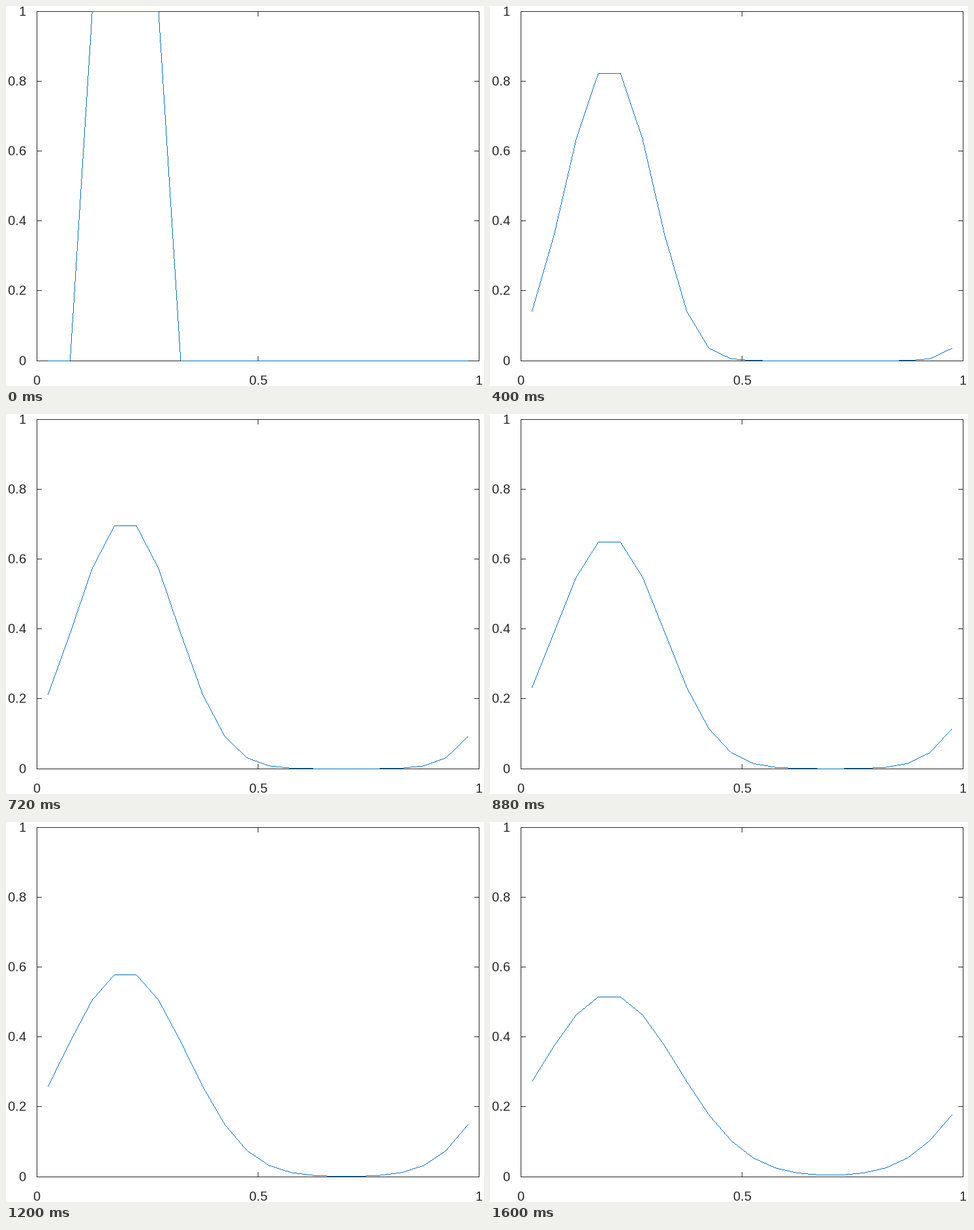
These frames come from a looping animation (733 px wide and 583 px high, 1680 ms). A matplotlib script:

```python
import math

import matplotlib.pyplot as plt
import numpy as np
from matplotlib.animation import FuncAnimation
from matplotlib.colors import to_rgba

W, H, DPI = 733, 583, 100
PX = 72 / DPI  # one pixel in points
LEFT, RIGHT, TOP, BOTTOM = 47.5, 725.5, 8.5, 544.1
TICK = 7
DIGIT, POINT = 11, 6  # whole-pixel pen advances of the label font
INK, BLUE = "#262626", "#0072bd"
CELLS, STEPS, RATE = 20, 21, 0.2


def to_x(v):
    return LEFT + v * (RIGHT - LEFT)


def to_y(v):
    return BOTTOM - v * (BOTTOM - TOP)


def centre(v):
    """Move a coordinate to the middle of its pixel."""
    return math.floor(v) + 0.5


def diffuse(u):
    """One explicit heat step on a periodic grid."""
    return u + RATE * (np.roll(u, 1) - 2 * u + np.roll(u, -1))


def solve():
    x = (np.arange(CELLS) + 0.5) / CELLS
    states = [np.where((x > 0.1) & (x < 0.3), 1.0, 0.0)]
    while len(states) < STEPS:
        states.append(diffuse(states[-1]))
    return x, states


def scan(a0, b0, a1, b1):
    """Pixels of a segment, one for each pixel centre passed along a."""
    if a0 > a1:
        a0, b0, a1, b1 = a1, b1, a0, b0
    a = np.arange(math.ceil(a0 - 0.5), math.ceil(a1 - 0.5))
    b = np.floor(np.interp(a + 0.5, [a0, a1], [b0, b1])).astype(int)
    return a, b


def raster(xs, ys):
    """Hard-edged polyline, one pixel wide, on a clear sheet."""
    sheet = np.zeros((H, W, 4))
    for x0, y0, x1, y1 in zip(xs, ys, xs[1:], ys[1:]):
        if abs(x1 - x0) >= abs(y1 - y0):
            cols, rows = scan(x0, y0, x1, y1)
        else:
            rows, cols = scan(y0, x0, y1, x1)
        sheet[rows, cols] = to_rgba(BLUE)
    return sheet


fig = plt.figure(figsize=(W / DPI, H / DPI), dpi=DPI, facecolor="white")
ax = fig.add_axes([0, 0, 1, 1])
ax.axis("off")
grid, states = solve()
curve = ax.imshow(np.zeros((H, W, 4)), extent=(0, W, H, 0), aspect="auto",
                  interpolation="nearest", zorder=2)
ax.set_xlim(0, W)
ax.set_ylim(H, 0)


def rule(x0, y0, x1, y1):
    ax.plot([centre(x0), centre(x1)], [centre(y0), centre(y1)], color=INK,
            lw=PX, snap=False, solid_capstyle="projecting", zorder=1)


def label(x, y, value, align):
    """Set a number on whole pixels; align is 0.5 for centre, 1 for right."""
    text = f"{value:g}"
    steps = [POINT if c == "." else DIGIT for c in text]
    pen = math.floor(x - align * sum(steps) + 0.5)
    for char, step in zip(text, steps):
        # Two leading spaces, as wide as a digit, keep the side bearing.
        ax.text(pen - DIGIT, y, "  " + char, ha="left", va="baseline",
                color=INK, family="Liberation Sans", fontsize=20 * PX)
        pen += step


for y in (TOP, BOTTOM):
    rule(LEFT, y, RIGHT, y)
for x in (LEFT, RIGHT):
    rule(x, TOP, x, BOTTOM)

for v in (0, 0.5, 1):
    x = to_x(v)
    rule(x, TOP, x, TOP + TICK)
    rule(x, BOTTOM, x, BOTTOM - TICK)
    label(x, 581, v, 0.5)

for v in np.linspace(0, 1, 6):
    y = to_y(v)
    rule(LEFT, y, LEFT + TICK, y)
    rule(RIGHT, y, RIGHT - TICK, y)
    label(31, math.floor(y) + 7, v, 1)


def draw(step):
    curve.set_data(raster(to_x(grid), to_y(states[step])))
    return (curve,)


anim = FuncAnimation(fig, draw, frames=STEPS, interval=80, repeat=True,
                     repeat_delay=0, blit=False)
plt.show()
```
